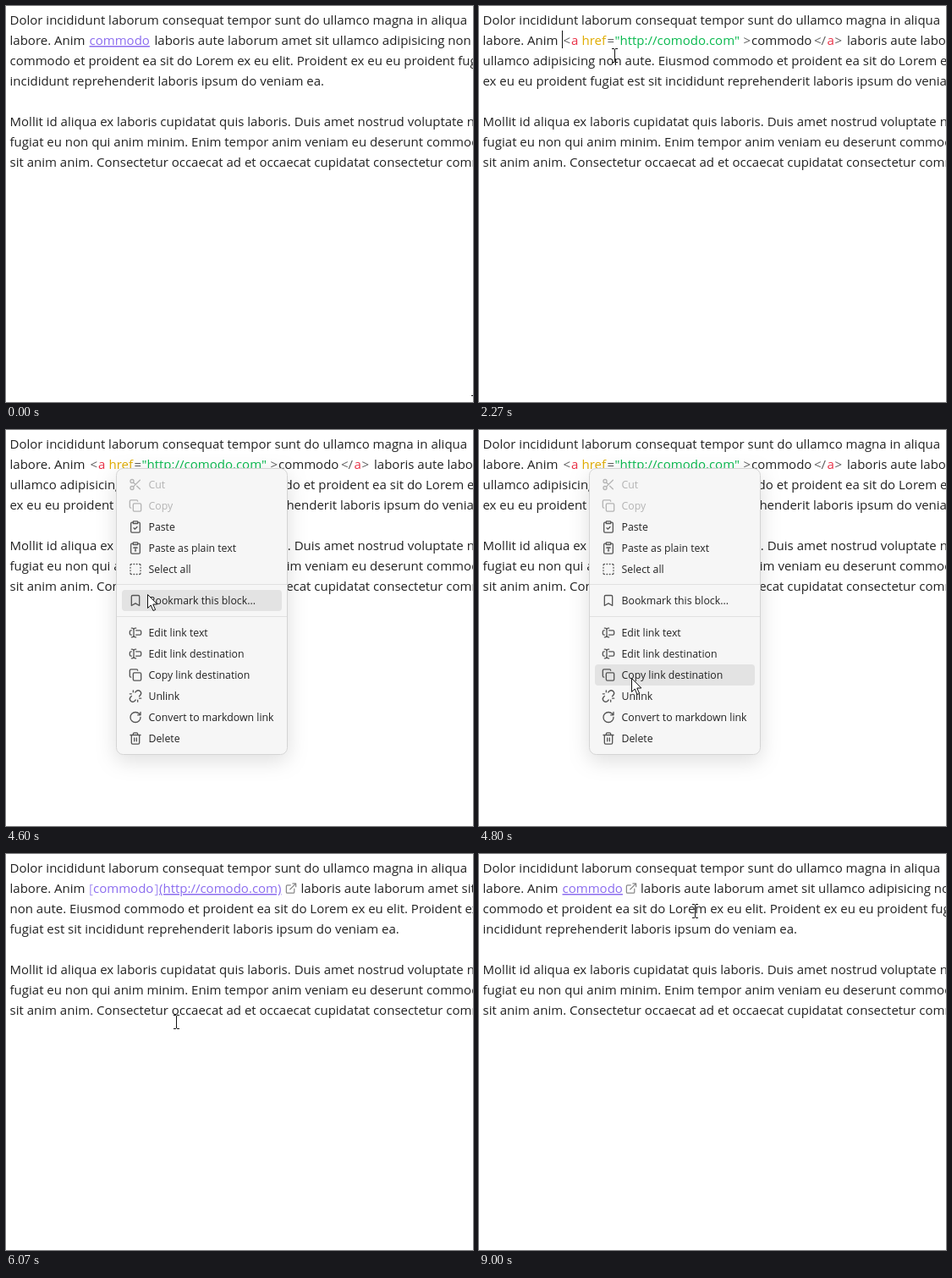
Write an HTML page that moves like this. It is 552x468 px and loops after 9270 ms.

```html
<!DOCTYPE html>
<html lang="en">
<head>
<meta charset="utf-8">
<title>Link menu</title>
<style>
  html, body { margin: 0; width: 100%; height: 100%; overflow: hidden; background: #fff; }
  svg { display: block; }
  text { font: 15px "Open Sans", "Noto Sans", sans-serif; fill: #222; white-space: pre; }
  .link { fill: #8b6cef; }
  .url { fill: #8b6cef; text-decoration: underline; }
  .mark { fill: #ab97f3; }
  .tag { fill: #e93147; }
  .attr { fill: #e0ac00; }
  .str { fill: #08b94e; }
  .punct { fill: #5c5c5c; }
  .icon { fill: none; stroke: #555; stroke-width: 2; stroke-linecap: round; stroke-linejoin: round; }
  .ext { stroke: #888; }
  #menu text { font-size: 12.3px; }
  #menu .off { fill: #b4b4b4; }
  #menu .icon.off { fill: none; stroke: #b4b4b4; }
  #panel { fill: #f6f6f6; stroke: #d4d4d4; filter: drop-shadow(0 7px 12px rgba(0, 0, 0, .13)); }
  #hover { fill: #e3e3e3; }
  .sep { stroke: #e0e0e0; shape-rendering: crispEdges; }
  #beam, #caret { shape-rendering: crispEdges; }
</style>
</head>
<body>
<svg id="stage" width="552" height="468" viewBox="0 0 552 468">
  <g id="common"></g>
  <g id="plain"></g>
  <g id="html"></g>
  <g id="markdown"></g>
  <g id="rendered"></g>
  <rect id="caret" width="1" height="21" fill="#111"/>
  <g id="menu">
    <rect id="panel" x="130.5" y="45.5" width="202" height="338" rx="8"/>
    <rect id="hover" x="137" width="189" height="25" rx="4"/>
    <path class="sep" d="M131 182.5H332M131 220.5H332"/>
  </g>
  <path id="beam" fill="none" stroke="#111" d="M-3 -7.5H0M1 -7.5H4M.5 -7V8M-3 8.5H0M1 8.5H4"/>
  <path id="arrow" fill="#fff" stroke="#111" d="M.5 .5V16.5L4.2 13 7 19.5 9.6 18.4 6.8 12H11.8Z"/>
</svg>
<script>
const LOOP = 9270, STEP = 1000 / 15;
const $ = id => document.getElementById(id);

function add(parent, tag, attrs, text = '') {
  const el = document.createElementNS('http://www.w3.org/2000/svg', tag);
  for (const key in attrs) el.setAttribute(key, attrs[key]);
  el.textContent = text;
  parent.append(el);
  return el;
}
const write = (parent, x, y, text, cls = '') => add(parent, 'text', { x, y, class: cls }, text);
const drawIcon = (parent, x, y, size, d, cls = '') => add(parent, 'path',
  { d, class: 'icon ' + cls, transform: `translate(${x} ${y}) scale(${size / 24})` });

const EXTERNAL = 'M18 13v6a2 2 0 0 1-2 2H5a2 2 0 0 1-2-2V8a2 2 0 0 1 2-2h6M15 3h6v6M10 14 21 3';
const TAIL = 'laboris aute laborum amet sit ullamco adipisicing non aute.';
const BODY = 'commodo et proident ea sit do Lorem ex eu elit. Proident ex eu eu proident fugiat est';
const END = 'incididunt reprehenderit laboris ipsum do veniam ea.';
const ROW = [22, 46, 70, 94, 142, 166, 190];

function buildText() {
  const common = $('common');
  write(common, 4.5, ROW[0], 'Dolor incididunt laborum consequat tempor sunt do ullamco magna in aliqua');
  write(common, 4.5, ROW[1], 'labore. Anim');
  write(common, 4.5, ROW[4], 'Mollit id aliqua ex laboris cupidatat quis laboris. Duis amet nostrud voluptate non');
  write(common, 4.5, ROW[5], 'fugiat eu non qui anim minim. Enim tempor anim veniam eu deserunt commodo');
  write(common, 4.5, ROW[6], 'sit anim anim. Consectetur occaecat ad et occaecat cupidatat consectetur commodo');

  const layouts = {
    plain: [[[98.5, 'commodo', 'url'], [175.5, TAIL]], BODY, END],
    rendered: [[[98.5, 'commodo', 'url'], [191, TAIL]], BODY, END],
    html: [[
      [99.5, '<', 'punct'], [109, 'a', 'tag'], [121.5, 'href', 'attr'], [151.5, '=', 'punct'],
      [160.5, '"http://comodo.com"', 'str'], [312.5, '>', 'punct'], [322, 'commodo'],
      [396, '</', 'punct'], [411.5, 'a', 'tag'], [420.5, '>', 'punct'], [435, TAIL]
    ], 'ullamco adipisicing non aute. Eiusmod ' + BODY, 'ex eu eu proident fugiat est sit ' + END],
    markdown: [[
      [98, '[', 'mark'], [103, 'commodo', 'link'], [175.5, ']', 'mark'],
      [181, '(http://comodo.com)', 'url'], [348.5, TAIL]
    ], 'non aute. Eiusmod ' + BODY, 'fugiat est sit ' + END]
  };
  for (const id in layouts) {
    const [parts, third, fourth] = layouts[id];
    for (const [x, text, cls] of parts) write($(id), x, ROW[1], text, cls);
    write($(id), 4.5, ROW[2], third);
    write($(id), 4.5, ROW[3], fourth);
  }
  drawIcon($('markdown'), 329.5, 33, 15, EXTERNAL, 'ext');
  drawIcon($('rendered'), 172.5, 33, 15, EXTERNAL, 'ext');
}

const BOARD = 'M9 2h6a1 1 0 0 1 1 1v3H8V3a1 1 0 0 1 1-1zM16 4h2a2 2 0 0 1 2 2v14a2 2 0 0 1-2 2H6a2 2 0 0 1-2-2V6a2 2 0 0 1 2-2h2';
const ICONS = {
  cut: 'M9 6a3 3 0 1 1-6 0 3 3 0 1 1 6 0M9 18a3 3 0 1 1-6 0 3 3 0 1 1 6 0M20 4 8.1 15.9M14.5 14.5 20 20M8.1 8.1 12 12',
  copy: 'M10 8h10a2 2 0 0 1 2 2v10a2 2 0 0 1-2 2H10a2 2 0 0 1-2-2V10a2 2 0 0 1 2-2M4 16a2 2 0 0 1-2-2V4a2 2 0 0 1 2-2h10a2 2 0 0 1 2 2',
  paste: BOARD + 'm9 14 2 2 4-4'.replace('m', 'M').replace('14 2 2', '14l2 2'),
  plain: BOARD + 'M9 12v-1h6v1M11 17h2M12 11v6',
  all: 'M3 5a2 2 0 0 1 2-2M19 3a2 2 0 0 1 2 2M21 19a2 2 0 0 1-2 2M5 21a2 2 0 0 1-2-2M9 3h1M14 3h1M9 21h1M14 21h1M3 9v1M3 14v1M21 9v1M21 14v1',
  bookmark: 'M19 21l-7-4-7 4V5a2 2 0 0 1 2-2h10a2 2 0 0 1 2 2z',
  edit: 'M5 4h1a3 3 0 0 1 3 3 3 3 0 0 1 3-3h1M13 20h-1a3 3 0 0 1-3-3 3 3 0 0 1-3 3H5M5 16H4a2 2 0 0 1-2-2v-4a2 2 0 0 1 2-2h1M13 8h7a2 2 0 0 1 2 2v4a2 2 0 0 1-2 2h-7M9 7v10',
  unlink: 'M18.8 12.3l1.7-1.8a5 5 0 0 0-.1-7 5 5 0 0 0-7 0l-1.7 1.7M5.2 11.8l-1.7 1.7a5 5 0 0 0 .1 7 5 5 0 0 0 7 0l1.7-1.7M8 2v3M2 8h3M16 19v3M19 16h3',
  convert: 'M21 12a9 9 0 1 1-9-9c2.5 0 4.9 1 6.7 2.7L21 8M21 3v5h-5',
  trash: 'M3 6h18M19 6v14a2 2 0 0 1-2 2H7a2 2 0 0 1-2-2V6M8 6V4a2 2 0 0 1 2-2h4a2 2 0 0 1 2 2v2M10 11v6M14 11v6'
};
const ITEMS = [
  [64, 'cut', 'Cut', 'off'], [89, 'copy', 'Copy', 'off'], [114, 'paste', 'Paste'],
  [139, 'plain', 'Paste as plain text'], [164, 'all', 'Select all'],
  [201, 'bookmark', 'Bookmark this block...'], [239, 'edit', 'Edit link text'],
  [264, 'edit', 'Edit link destination'], [289, 'copy', 'Copy link destination'],
  [314, 'unlink', 'Unlink'], [339, 'convert', 'Convert to markdown link'], [364, 'trash', 'Delete']
];
function buildMenu() {
  for (const [y, icon, label, cls] of ITEMS) {
    drawIcon($('menu'), 145, y - 7.5, 16, ICONS[icon], cls);
    write($('menu'), 168.5, y + 4.5, label, cls);
  }
}

// Pointer path: time, x, y
const PATH = [
  [0, 553, 468], [70, 553, 468], [400, 420, 330], [700, 220, 150], [1000, 100, 51],
  [1130, 95, 45], [1330, 95, 45], [1470, 166, 64], [1530, 160, 58],
  [3270, 160, 58], [3600, 142, 50], [3870, 130, 43], [4200, 130, 43],
  [4530, 162, 160], [4800, 180, 293], [5070, 185, 331], [5130, 185, 330], [5200, 185, 331],
  [5530, 185, 331], [5600, 187, 331], [6070, 201, 198], [6530, 262, 98],
  [6730, 258, 72], [6870, 258, 72], [7130, 256, 69], [7270, 254, 62], [7400, 255, 67], [LOOP, 255, 67]
];
// Caret spans: from, to, x, top
const CARETS = [
  [1270, 1800, 93, 29], [2270, 2470, 98, 29], [2470, 3000, 108, 29], [3530, 3930, 108, 29],
  [3930, 4270, 130, 29], [5530, 6070, 343, 29], [6600, 7130, 343, 29],
  [7600, 7930, 114, 53], [8470, 9000, 114, 53]
];

function pointerAt(t) {
  const i = Math.max(1, PATH.findIndex(key => key[0] > t));
  const [t0, x0, y0] = PATH[i - 1], [t1, x1, y1] = PATH[i];
  const k = (t - t0) / (t1 - t0);
  return [Math.round(x0 + (x1 - x0) * k), Math.round(y0 + (y1 - y0) * k)];
}
const show = (id, on) => { $(id).style.display = on ? '' : 'none'; };

function render(t) {
  show('plain', t < 2270);
  show('html', t >= 2270 && t < 5530);
  show('markdown', t >= 5530 && t < 7600);
  show('rendered', t >= 7600);

  const caret = CARETS.find(([from, to]) => t >= from && t < to);
  show('caret', caret);
  if (caret) {
    $('caret').setAttribute('x', caret[2]);
    $('caret').setAttribute('y', caret[3]);
  }

  // The pointer is sampled 15 times a second
  const tick = Math.round(Math.floor((t + 4) / STEP) * STEP / 10) * 10;
  const [x, y] = pointerAt(Math.min(tick, LOOP - 1));
  const open = t >= 3930 && t < 5530;
  const onMenu = open && t >= 4270;
  const item = onMenu && ITEMS.find(([row, , , cls]) => !cls && Math.abs(y - row) <= 12.5);
  show('menu', open);
  show('hover', item);
  if (item) $('hover').setAttribute('y', item[0] - 12);
  show('arrow', onMenu);
  show('beam', !onMenu);
  $(onMenu ? 'arrow' : 'beam').setAttribute('transform', `translate(${x} ${y})`);
}

buildText();
buildMenu();
const start = performance.now();
function frame() {
  render((performance.now() - start) % LOOP);
  requestAnimationFrame(frame);
}
render(0);
requestAnimationFrame(frame);
</script>
</body>
</html>
```
